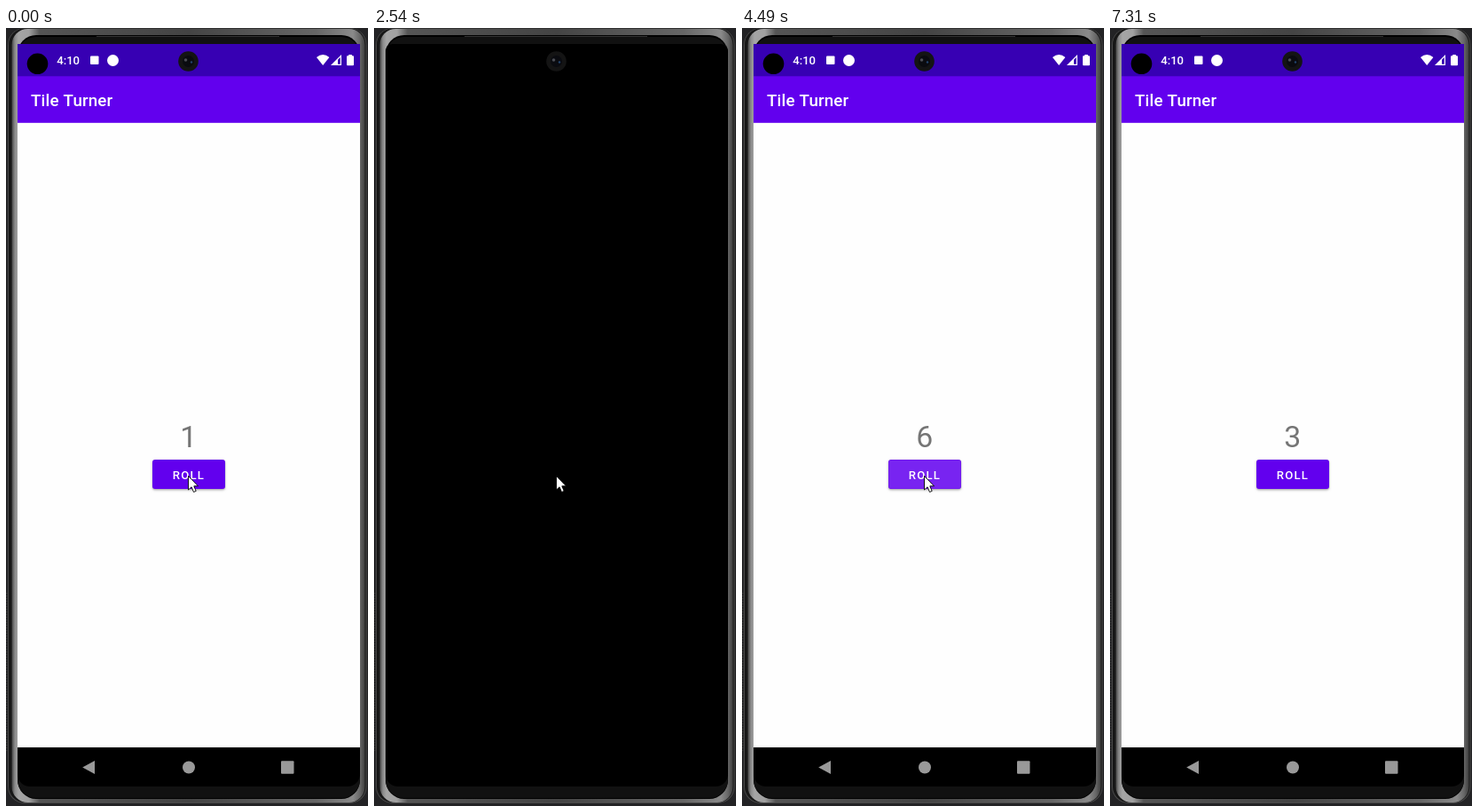
Write an HTML page with a canvas that moves like this. It is 408x876 px and loops after 7710 ms.

```html
<!DOCTYPE html>
<html lang="en">
<head>
<meta charset="utf-8">
<title>Tile Turner</title>
<style>
  html, body { margin: 0; width: 100%; height: 100%; overflow: hidden; background: #232325; }
  canvas { display: block; width: 408px; height: 876px; }
</style>
</head>
<body>
<canvas id="stage" width="408" height="876"></canvas>
<script>
const ctx = document.getElementById('stage').getContext('2d');
const LOOP = 7710;
const HOLD = 138;       // the screen refreshes about every 138 ms after a click
const DP = 386 / 411;   // one layout unit in pixels
const PURPLE = '#6200ee';

const CLICKS = [
  { time: 430, face: 5, lift: 0 },
  { time: 1410, face: 1, lift: .7 },
  { time: 2410, face: 1, lift: 1, blank: true },
  { time: 3400, face: 2, lift: .6 },
  { time: 4190, face: 6, lift: .7 },
  { time: 4870, face: 4, lift: .4 },
  { time: 5560, face: 5, lift: .6 },
  { time: 6480, face: 3, lift: .4 }
];
const LEAVE = 6890;     // the pointer sets off for the corner

// Refreshes since a moment, with a little slack for early ones.
const refreshes = (t, since) => Math.floor((t - since + 15) / HOLD);

function buttonState(t) {
  const i = CLICKS.findLastIndex(c => c.time <= t);
  const before = i > 0 ? CLICKS[i - 1].face : 1;
  if (i < 0) return { face: before, ripple: 0, lift: 0 };
  const click = CLICKS[i];
  const n = refreshes(t, click.time);
  const ripple = Math.max(0, 1 - n / (click.blank ? 2 : 3));
  return {
    face: n > 0 ? click.face : before,
    ripple,
    lift: n > 0 ? 0 : click.lift,
    blank: click.blank && n === 1
  };
}

function pointer(t) {
  if (t < LEAVE) return [205.5, 504.5];
  const n = refreshes(t, LEAVE);
  return n < 3 ? [205.5 + 73 * n, 674.5 + 89.5 * n] : null;
}

function rect(x, y, w, h, color) {
  ctx.fillStyle = color;
  ctx.fillRect(x, y, w, h);
}

function round(x, y, w, h, r, color) {
  ctx.beginPath();
  ctx.roundRect(x, y, w, h, r);
  ctx.fillStyle = color;
  ctx.fill();
}

function disc(x, y, r, color) {
  ctx.beginPath();
  ctx.arc(x, y, r, 0, Math.PI * 2);
  ctx.fillStyle = color;
  ctx.fill();
}

function poly(points, color) {
  ctx.beginPath();
  points.forEach(([x, y]) => ctx.lineTo(x, y));
  ctx.closePath();
  ctx.fillStyle = color;
  ctx.fill();
}

function text(str, x, y, size, weight, color, spacing = 0, align = 'left') {
  ctx.font = `${weight} ${size * DP}px Roboto, sans-serif`;
  ctx.letterSpacing = spacing * size * DP + 'px';
  ctx.textAlign = align;
  ctx.fillStyle = color;
  ctx.fillText(str, x, y);
}

function across(x0, x1, stops) {
  const g = ctx.createLinearGradient(x0, 0, x1, 0);
  stops.forEach(([pos, color]) => g.addColorStop(pos, color));
  return g;
}

function drawPhone() {
  rect(0, 0, 408, 876, '#232325');
  for (let y = 636; y < 815; y += 3) rect(0, y, 1.5, 1, '#383838');
  round(2, 0, 404.5, 873, 19, '#4b4b4b');
  round(3, .5, 402.5, 871.5, 18, '#171717');
  round(6.5, 1, 398, 871, 18, across(6, 405, [
    [0, '#3a3a3a'], [.01, '#8a8a8a'], [.02, '#a5a5a5'], [.05, '#a0a0a0'], [.08, '#555'],
    [.5, '#444'], [.86, '#666'], [.965, '#8a8a8a'], [.985, '#666'], [1, '#3a3a3a']
  ]));
  round(13, 8, 386, 860, 21, '#000');
  round(13, 10, 386, 857, 21, '#111');
  rect(102, 9, 206, 1, '#333');
  round(13, 18, 386, 836, [8, 8, 14, 14], '#000');
}

function drawStatusBar() {
  rect(13, 18, 386, 36.3, '#3700b3');
  disc(35.5, 40.3, 11.8, '#000');
  text('4:10', 57.2, 41, 14, 500, '#fff');
  round(95, 31.5, 9.5, 9.5, 1, '#fff');
  disc(120.5, 36.5, 6.5, '#fff');

  ctx.beginPath();
  ctx.moveTo(357.2, 42);
  ctx.lineTo(350, 33);
  ctx.quadraticCurveTo(357.2, 27.2, 364.4, 33);
  ctx.fillStyle = '#fff';
  ctx.fill();
  poly([[366, 42], [378, 42], [378, 30]], '#fff');
  poly([[374, 40.8], [376.8, 40.8], [376.8, 33], [374, 35.8]], '#3700b3');
  round(384, 31.3, 8, 11, 1, '#fff');
  rect(386.2, 30, 3.6, 2, '#fff');
}

function drawCamera() {
  disc(205.5, 37.5, 11.3, '#141414');
  disc(205.5, 37.5, 6.5, '#0a0b10');
  disc(202.5, 36, 1.8, '#4b4d54');
  disc(209, 38.5, 1.2, '#23446e');
}

function drawNav() {
  const gray = '#999';
  poly([[86.2, 832.5], [100, 825], [100, 840]], gray);
  disc(206, 832.5, 7, gray);
  round(310, 825.3, 14.5, 14.5, 1, gray);
}

function drawButton(ripple, lift) {
  ctx.save();
  ctx.shadowColor = `rgba(0,0,0,${.36 - .08 * lift})`;
  ctx.shadowBlur = 2.5 + 4 * lift;
  ctx.shadowOffsetY = 1.3 + 2.3 * lift;
  round(165, 486, 82, 33, 3, PURPLE);
  ctx.restore();
  round(165.2, 486.2, 81.6, 32.6, 4, `rgba(255,255,255,${.42 * ripple})`);
  text('ROLL', 187.8, 507.6, 14, 500, '#fff', .0893);
}

function drawApp({ face, ripple, lift }) {
  rect(13, 54, 386, 756, '#fefefe');
  rect(13, 54, 386, 52.8, PURPLE);
  drawStatusBar();
  text('Tile Turner', 28, 88, 20, 500, '#fff', .0075);
  text(face, 205.8, 471.5, 36, 400, '#757575', 0, 'center');
  drawButton(ripple, lift);
  drawNav();
}

function drawPointer([x, y]) {
  const arrow = [[0, 0], [0, 15.5], [3.6, 12.3], [6, 18], [8.7, 16.9], [6.3, 11.3], [11, 11.3]];
  poly(arrow.map(([dx, dy]) => [x + dx, y + dy]), '#fff');
  ctx.strokeStyle = '#000';
  ctx.lineWidth = .9;
  ctx.stroke();
}

function draw(t) {
  const state = buttonState(t);
  const tip = pointer(t);
  drawPhone();
  if (!state.blank) drawApp(state);
  drawCamera();
  if (tip) drawPointer(tip);
}

const start = performance.now();
function tick() {
  draw((performance.now() - start) % LOOP);
  requestAnimationFrame(tick);
}
tick();
</script>
</body>
</html>
```
